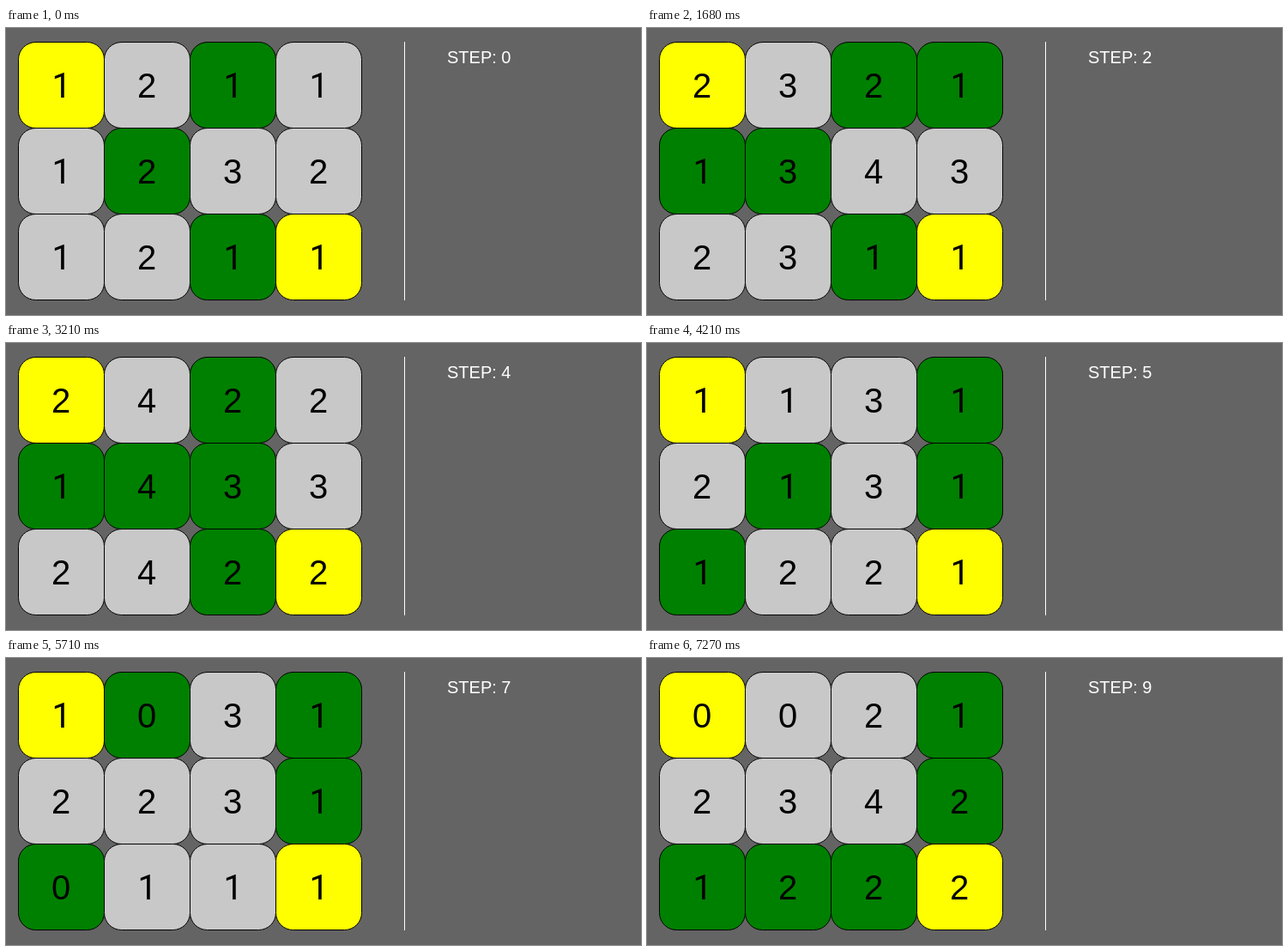
Recreate the animation shown at these times as an HTML page with a canvas. Size 740 by 334 pixels, loop 9280 ms.

```html
<!DOCTYPE html>
<html lang="en">
<head>
<meta charset="utf-8">
<title>Cell automaton</title>
<style>
  html, body { margin: 0; width: 100%; height: 100%; overflow: hidden; background: #646464; }
  canvas { display: block; }
</style>
</head>
<body>
<canvas id="stage" width="740" height="334"></canvas>
<script>
const ctx = document.getElementById("stage").getContext("2d");
const COLS = 4, ROWS = 3, SIZE = 100, LEFT = 14.5, TOP = 16.5, RADIUS = 20;
const LOOP = 9280;
const STEP_TIMES = [0, 1010, 1680, 2410, 3210, 4210, 5010, 5710, 6470, 7270];
const FONT = "'Liberation Sans', Arial, sans-serif";
const FOOTLESS_FONT = "Roboto, sans-serif";
const COLORS = { Y: "#ffff00", G: "#008000", ".": "#c8c8c8" };

function countNeighbours(board, row, col) {
  let count = 0;
  for (let r = row - 1; r <= row + 1; r++) {
    for (let c = col - 1; c <= col + 1; c++) {
      if ((r !== row || c !== col) && board[r]?.[c] === "G") count++;
    }
  }
  return count;
}

// Empty cells turn green with 2-3 green neighbours; green cells need 4-5 to stay.
function nextCell(cell, count) {
  if (cell === "Y") return "Y";
  const alive = cell === "G" ? count === 4 || count === 5 : count === 2 || count === 3;
  return alive ? "G" : ".";
}

function nextBoard(board) {
  return board.map((line, r) =>
    [...line].map((cell, c) => nextCell(cell, countNeighbours(board, r, c))).join(""));
}

const boards = [["Y.G.", ".G..", "..GY"]];
while (boards.length < STEP_TIMES.length) boards.push(nextBoard(boards.at(-1)));

// The digit 1 has a plain stem without a foot.
function drawDigit(digit, centerX, baseline, size) {
  const isOne = digit === 1;
  ctx.font = `${size}px ${isOne ? FOOTLESS_FONT : FONT}`;
  ctx.textAlign = "center";
  ctx.fillText(digit, centerX + (isOne ? size * 0.02 : 0), baseline);
}

function drawCell(board, row, col) {
  const x = LEFT + col * SIZE, y = TOP + row * SIZE;
  ctx.beginPath();
  ctx.roundRect(x, y, SIZE, SIZE, RADIUS);
  ctx.fillStyle = COLORS[board[row][col]];
  ctx.fill();
  ctx.strokeStyle = "#000";
  ctx.stroke();
  ctx.fillStyle = "#000";
  drawDigit(countNeighbours(board, row, col), x + 49.5, y + 64.5, 40);
}

function drawDivider() {
  ctx.beginPath();
  ctx.moveTo(464.5, TOP);
  ctx.lineTo(464.5, TOP + ROWS * SIZE);
  ctx.strokeStyle = "#fff";
  ctx.stroke();
}

function drawLabel(step) {
  const label = "STEP: ";
  ctx.fillStyle = "#fff";
  ctx.font = `20px ${FONT}`;
  ctx.textAlign = "left";
  ctx.fillText(label, 514, 41);
  const labelEnd = 514 + ctx.measureText(label).width;
  drawDigit(step, labelEnd + 5.56, 41, 20);
}

function draw(step) {
  ctx.fillStyle = "#646464";
  ctx.fillRect(0, 0, 740, 334);
  ctx.lineWidth = 1;
  ctx.lineCap = "round";
  for (let row = 0; row < ROWS; row++) {
    for (let col = 0; col < COLS; col++) drawCell(boards[step], row, col);
  }
  drawDivider();
  drawLabel(step);
}

function tick() {
  const time = performance.now() % LOOP;
  draw(STEP_TIMES.findLastIndex(start => time >= start));
  requestAnimationFrame(tick);
}
tick();
</script>
</body>
</html>
```
